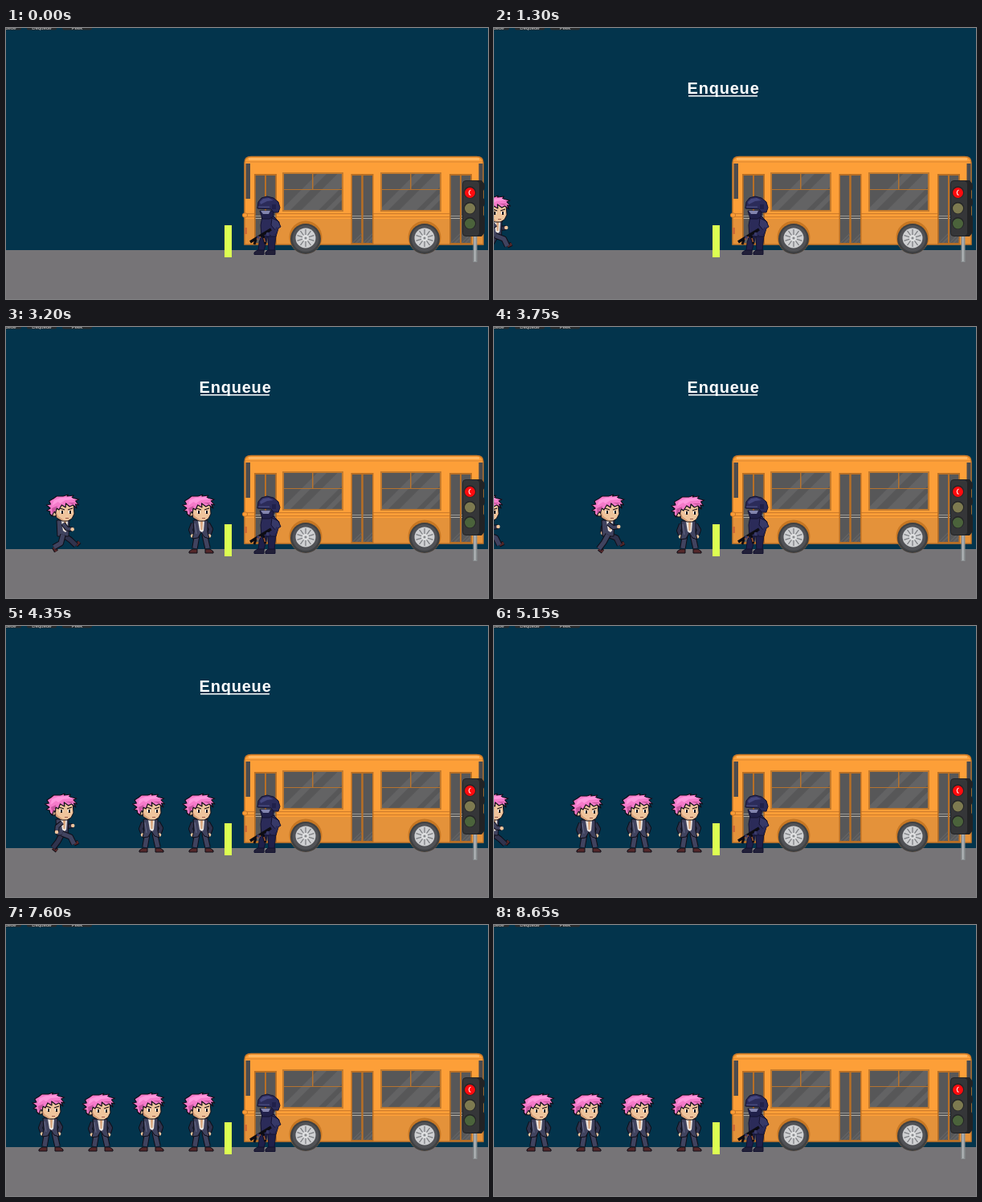
Recreate the animation shown at these times as an HTML page with a canvas. Size 600 px wide and 338 px high, loop 8750 ms.

```html
<!DOCTYPE html>
<html lang="en">
<head>
<meta charset="utf-8">
<title>Enqueue</title>
<style>
html, body { margin: 0; width: 100%; height: 100%; overflow: hidden; background: #03344c; }
canvas { display: block; }
</style>
</head>
<body>
<canvas id="stage" width="600" height="338"></canvas>
<script>
const ctx = document.getElementById('stage').getContext('2d');
const LOOP = 8750, STEP = 50, SPEED = 0.13, STRIDE = 600, GROUND = 283;
const SUIT = '#40435f', SUIT_DARK = '#30334d', SKIN = '#efc49c', SHOE = '#54282a', INK = '#100e18';

// Queue slot, arrival time and stride offset of each passenger
const passengers = [
  { home: 240, arrive: 3142, offset: 0.337 },
  { home: 178, arrive: 4031, offset: 0.26 },
  { home: 115, arrive: 4704, offset: 0.84 },
  { home: 53, arrive: 5581, offset: 0.593 },
];

function rect(color, x, y, w, h) {
  ctx.fillStyle = color;
  ctx.fillRect(x, y, w, h);
}

function shape(fill, d, stroke, width = 1) {
  const path = new Path2D(d);
  if (fill) { ctx.fillStyle = fill; ctx.fill(path); }
  if (stroke) { ctx.strokeStyle = stroke; ctx.lineWidth = width; ctx.stroke(path); }
}

function round(color, x, y, w, h, r, stroke, width = 1) {
  ctx.beginPath();
  ctx.roundRect(x, y, w, h, r);
  ctx.fillStyle = color;
  ctx.fill();
  if (stroke) { ctx.strokeStyle = stroke; ctx.lineWidth = width; ctx.stroke(); }
}

function disc(color, x, y, r) {
  ctx.fillStyle = color;
  ctx.beginPath();
  ctx.arc(x, y, r, 0, 7);
  ctx.fill();
}

function limb(color, width, d) {
  ctx.lineJoin = 'round';
  shape(null, d, INK, width + 2);
  shape(null, d, color, width);
}

function at(x, y, draw) {
  ctx.save();
  ctx.translate(x, y);
  draw();
  ctx.restore();
}

function glass(x, y, w, h) {
  ctx.save();
  ctx.beginPath();
  ctx.rect(x, y, w, h);
  ctx.clip();
  rect('#575758', x, y, w, h);
  for (const [start, band] of [[-0.05, 0.16], [0.3, 0.3], [0.72, 0.11]]) {
    shape('#636364', `M${x + w * start},${y + h} l${h},${-h} h${w * band} l${-h},${h}z`);
  }
  ctx.restore();
}

function busWindow(x) {
  rect('#c37a2d', x - 1, 180, 76, 49);
  glass(x + 1, 182, 72, 45);
  rect('#b5732e', x + 1, 201, 72, 1);
  rect('#b5732e', x + 36, 182, 1.5, 19);
}

function door(x) {
  rect('#b86f25', x, 182, 28, 88);
  for (const dx of [1.5, 15]) {
    glass(x + dx, 184, 11.5, 84);
    rect('#9b9994', x + dx, 234, 11.5, 1);
    rect('#b3aea5', x + dx, 237, 11.5, 1);
  }
}

function wheel(x) {
  disc('#c77723', x, 261, 20.5);
  disc('#3f4042', x, 263, 19);
  disc('#515256', x, 262.5, 16.5);
  disc('#cfd0d2', x, 262, 12.5);
  at(x, 262, () => {
    for (let i = 0; i < 10; i++) {
      ctx.rotate(Math.PI / 5);
      rect('#77797d', -0.6, -11, 1.2, 7);
    }
  });
  disc('#dedfe0', x, 262, 4);
  disc('#85878a', x, 262, 1.6);
}

function bus() {
  const body = 'M297,270 V168 Q297,160.5 305,160.5 H586 Q594,160.5 594,168 V270Z';
  shape('#fd9f38', body);
  rect('#e4923a', 297, 238, 297, 32);
  shape(null, body, '#c77728', 1.5);
  rect('#ffb660', 302, 162, 287, 3);
  rect('#d98532', 298, 166.5, 295, 1);
  rect('#4b4b4e', 298.5, 169, 5.5, 44);
  rect('#4b4b4e', 588.5, 169, 5, 44);
  rect('#cf7d2c', 297, 231, 297, 1.2);
  rect('#cf7d2c', 297, 235, 297, 1.2);
  for (const x of [309, 429.5, 552]) door(x);
  for (const x of [345, 467]) busWindow(x);
  for (const x of [373, 521]) wheel(x);
  round('#fa9c36', 294.5, 231, 6, 5, 2, '#c77728');
  rect('#cf6a35', 297, 249, 3, 8);
}

function trafficLight() {
  rect('#8c9194', 581.5, 258, 5, 34);
  rect('#b5b9bb', 583, 260, 1.5, 31);
  shape('#222325', 'M572,190 H592 L596,195 V200 L594,203 V212 L596,215 V220 L594,223 V233 L596,236 V255 L592,260 H572Z');
  round('#353638', 568.5, 190.5, 21, 69, 4, '#222325');
  for (const [y, color] of [[205.5, '#ff0b0e'], [225, '#7d7a50'], [244, '#4b633b']]) {
    disc('#242526', 577.5, y - 0.5, 7.6);
    disc(color, 577.5, y, 6.5);
  }
  shape(null, 'M578.5,202 A3.5 3.5 0 0 0 578.5,208.5', '#ffd9d5', 1.3);
}

// Hair leans around the forehead line by the given shear
function hair(sway) {
  ctx.save();
  ctx.transform(1, 0, sway, 1, sway * 56, 0);
  shape('#f57bca',
    'M-17,-66 L-12,-69 L-8,-72 L0,-72 L6,-74 L5,-72 L13,-73 L11,-70 L20,-68 L16,-66 ' +
    'L20,-61 L16,-62 L18,-57 L13,-61 L9,-59 L4,-63 L4,-58 L-1,-61 L-4,-55 L-7,-57 ' +
    'L-8,-51 L-10,-53 L-12,-47 L-15,-50 L-15,-53 L-19,-54 L-15,-57 L-20,-61 L-15,-62Z', INK, 1.2);
  shape('#ff97dc', 'M-11,-67 L-3,-70 L9,-71 L15,-68 L3,-67 L-3,-63 L-6,-65 L-13,-60Z');
  shape('#c9559f', 'M-13,-57 L-6,-60 L-9,-54 L-12,-50Z M6,-64 L16,-64 L12,-62Z');
  ctx.restore();
}

function head(sway) {
  disc(INK, -10, -50, 3.5);
  disc(SKIN, -10, -50, 2.5);
  shape(SKIN, 'M-10,-60 L0,-63 H14 L15,-50 L12,-44 L7,-41 H0 L-7,-45Z', INK);
  shape('#d49b74', 'M-8,-54 L-5,-47 L2,-42 H0 L-7,-46Z');
  for (const x of [-1, 9]) {
    rect('#fff', x - 1, -54, 3.5, 3);
    rect(INK, x, -54, 2, 4);
  }
  shape(null, 'M-3,-57 L3,-55 M7,-55 L13,-57', INK, 1.2);
  rect('#9c5849', 4, -45, 4, 1);
  hair(sway);
}

function shirt() {
  shape('#ece5e0', 'M-1,-41 H7 L6,-29 L4,-27 L1,-29Z');
  shape('#d8a47c', 'M2,-41 H5 L4.5,-30 H2.5Z');
}

function stand(swing) {
  const bob = swing > 0 ? 0 : 1;
  limb(SUIT, 5.5, 'M-2,-25 L-5,-7');
  limb(SUIT, 5.5, 'M7,-25 L11,-7');
  shape(SHOE, 'M-8,-6 H-2 V-1 H-12 V-3Z M8,-6 H14 L18,-3 V-1 H8Z', INK);
  at(0, bob, () => {
    limb(SUIT_DARK, 4, 'M-7,-38 L-10,-30 L-8,-25');
    limb(SUIT_DARK, 4, 'M11,-38 L15,-31 L13,-25');
    disc(SKIN, -8, -22.5, 2.2);
    disc(SKIN, 13, -22.5, 2.2);
    shape(SUIT, 'M-7,-42 H11 L11,-27 L13,-19 L7,-21 L3,-27 L-1,-20 L-8,-19 L-6,-28Z', INK);
    shirt();
    shape(null, 'M-5,-38 L-3,-25', '#666a86');
    head(swing * 0.15);
  });
}

function leg(phase, color) {
  const thigh = 0.85 * Math.sin(phase) + 0.35;
  const shin = thigh - 0.15 - 1.3 * Math.max(0, Math.sin(phase + 1.2) + 0.1);
  const kx = 1 + 11 * Math.sin(thigh), ky = -24 + 11 * Math.cos(thigh);
  const fx = kx + 10 * Math.sin(shin), fy = ky + 10 * Math.cos(shin);
  limb(SHOE, 3.5, `M${fx},${fy} l${6 * Math.cos(shin)},${-6 * Math.sin(shin)}`);
  limb(color, 5.5, `M1,-24 L${kx},${ky} L${fx},${fy}`);
}

function arm(phase, color) {
  const a = 0.9 * Math.sin(phase);
  const x = 1 + 8 * Math.sin(a), y = -38 + 8 * Math.cos(a);
  const hx = x + 7 * Math.sin(a + 0.8), hy = y + 7 * Math.cos(a + 0.8);
  limb(color, 4, `M1,-38 L${x},${y} L${hx},${hy}`);
  disc(SKIN, hx, hy, 2.3);
}

function run(cycle) {
  const phase = Math.round(cycle * 8) / 4 * Math.PI;
  leg(phase + Math.PI, SUIT_DARK);
  arm(phase, SUIT_DARK);
  shape(SUIT, 'M-7,-42 H9 L8,-22 H-6Z', INK);
  shirt();
  leg(phase, SUIT);
  arm(phase + Math.PI, SUIT);
  head(0.1 * Math.sin(phase));
}

function passenger({ home, arrive, offset }, t) {
  const ahead = t - arrive;
  const x = Math.round(home + Math.min(0, ahead) * SPEED);
  if (x < -24) return;
  at(x, GROUND, () => {
    if (ahead < 0) run(ahead / STRIDE + offset);
    else stand(Math.sin(ahead / 130));
  });
}

function guard(t) {
  const lift = t % 1300 < 400 ? 0 : 1;
  const navy = '#2b2b59', dark = '#20204a', edge = '#131230', gun = '#0d0c13';
  shape(dark, 'M318,258 H326 L321,278 H314 L315,268Z M326,258 H336 L334,278 H327Z', edge);
  shape('#222039', 'M313,277 H321 V282.500 H309 V280Z M326,277 H335 V282.500 H323 V280Z', edge);
  at(0, lift, () => {
    shape(navy, 'M319,235 H333 L340,242 L339,250 L336,260 H318 L317,246Z', edge);
    shape('#373968', 'M331,237 L339,241 L342,248 L335,252 L330,246Z', edge);
    rect(dark, 318, 255, 18, 3);
    shape(dark, 'M316,228 H333 V235 L328,238 H319Z', edge);
    shape('#8284ae', 'M317,228 H329 L327,232 H320Z');
    shape(navy, 'M313,225 L314,217 L318,212 L325,210 L333,212 L339,217 L341,224 L339,230 H333 L330,226Z', edge);
    shape('#45477f', 'M316,217 L320,213 L327,212 L333,215 L325,216 L317,220Z');
    rect(dark, 331, 220, 5, 6);
    rect('#474a7d', 314, 222.5, 14, 1.5);
    shape(null, 'M304,267 L312,262 L330,251', gun, 3.5);
    shape(null, 'M311,264 L309,270 M320,259 L323,269 M326,255 L330,258', gun, 3);
    shape(null, 'M312,263.5 L317,260.5 M321,262 L322.5,267', '#a0583a', 1.5);
    disc('#3a3b6b', 314, 261, 1.8);
    disc('#3a3b6b', 326, 257, 2.3);
    shape(null, 'M338,249 L334,256 L327,257', navy, 3.5);
  });
}

function buttons() {
  ctx.font = '6px "Liberation Sans", Arial, sans-serif';
  ctx.textAlign = 'center';
  ['Enqueue', 'Dequeue', 'Peek'].forEach((label, i) => {
    const x = i * 44 - 18;
    round('#292b2d', x, -12, 37, 14.5, 2);
    ctx.fillStyle = '#dddddd';
    ctx.fillText(label, x + 18.5, 1.6);
  });
}

function title() {
  ctx.font = 'bold 20px "Liberation Sans", Arial, sans-serif';
  ctx.textAlign = 'left';
  ctx.letterSpacing = '0.8px';
  ctx.fillStyle = '#fff';
  ctx.fillText('Enqueue', 240.5, 82);
  ctx.letterSpacing = '0px';
  rect('#fff', 242, 84, 86, 1.5);
}

function frame(now) {
  const t = Math.floor(now % LOOP / STEP) * STEP;
  rect('#03344c', 0, 0, 600, 277);
  rect('#767477', 0, 277, 600, 61);
  buttons();
  if (t >= 950 && t < 4900) title();
  bus();
  trafficLight();
  rect('#dcff52', 272, 246, 9, 40);
  guard(t);
  for (const p of passengers) passenger(p, t);
  requestAnimationFrame(frame);
}
requestAnimationFrame(frame);
</script>
</body>
</html>
```
